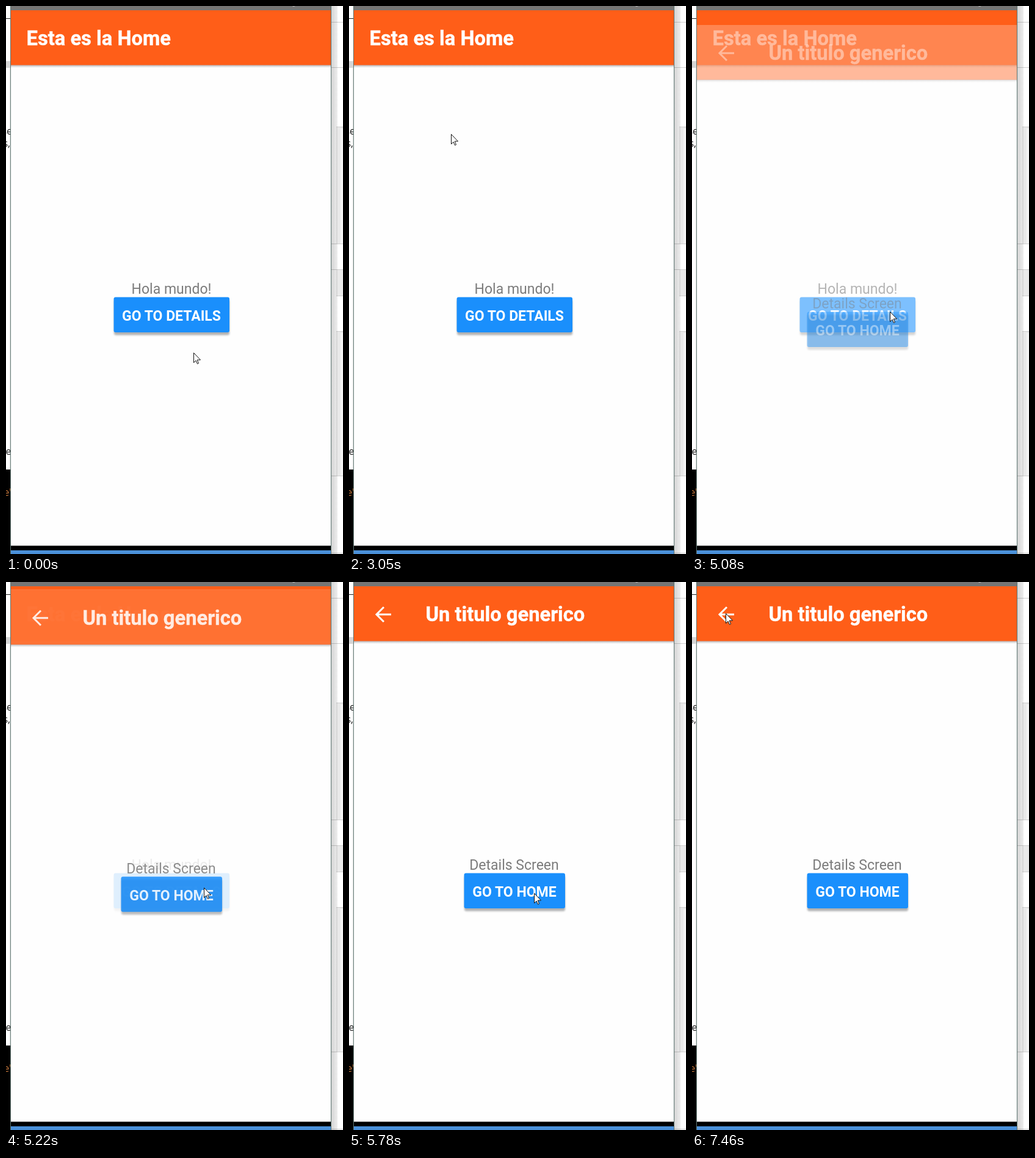
Animation, 552 px wide and 895 px high, one loop 8 s. Source, as an HTML page:

```html
<!DOCTYPE html>
<html lang="es">
<meta charset="utf-8">
<style>
  html, body { margin: 0; width: 100%; height: 100%; overflow: hidden; background: #fff }
  svg { display: block; width: 552px; height: 895px; font: 23px Roboto, sans-serif }
  .title { font-size: 32.7px; font-weight: 700; fill: #fff; stroke: #fff; stroke-width: .4 }
  .label { font-weight: 700; fill: #fff; text-anchor: middle }
  .note { fill: #7c7c7c; text-anchor: middle }
  .bar { fill: #ff5e18 }
  .button { fill: #1a8ffc }
  .shade { opacity: .3; filter: blur(1.8px) }
  .soft { filter: blur(.5px) }
  .page { font: 16px "Open Sans", sans-serif; fill: #222; text-anchor: end }
  /* each part fades on its own, so overlapping parts show through */
  #details > * { opacity: var(--shown) }
</style>
<svg viewBox="0 0 552 895">
  <defs>
    <linearGradient id="drop" x2="0" y2="1">
      <stop stop-color="#88858c" stop-opacity=".7"/>
      <stop offset="1" stop-color="#aaa" stop-opacity="0"/>
    </linearGradient>
    <linearGradient id="side">
      <stop stop-color="#000" stop-opacity=".17"/>
      <stop offset="1" stop-color="#000" stop-opacity=".07"/>
    </linearGradient>
    <clipPath id="screen"><path d="M8 0H532V882H8Z"/></clipPath>
  </defs>

  <!-- windows behind the phone -->
  <path fill="#e9e9e9" d="M541 197h11v191h-11zM541 431h11v42h-11zM541 532h11v235h-11z"/>
  <path fill="#f4f4f4" d="M548 200h4v188h-4zM548 534h4v233h-4z"/>
  <path stroke="#cfcfcf" d="M533 26.5h19M533 100.5h19M541 197.5h11M533 388.5h19M533 430.5h19M541 473.5h11M541 531.5h11M533 767.5h19M533 893.5h19"/>
  <path fill="url(#side)" d="M533 0h10v895h-10z"/>
  <path fill="#d6d6d6" d="M0 90h8v11H0z"/>
  <path fill="#f1f1f1" d="M5 101h3v656H5z"/>
  <path stroke="#222" d="M0 20.5h8"/>
  <path d="M0 757h8v138H0z"/>
  <g class="page">
    <text x="10" y="210">se</text>
    <text x="7" y="230">s,</text>
    <text x="8.5" y="733">e</text>
    <text x="8.5" y="800" fill="#c8783c" style="fill:#c8783c">e'</text>
  </g>

  <!-- phone -->
  <path fill="#fefefe" d="M8 0h524v895H8z"/>
  <g clip-path="url(#screen)"><g class="soft">
    <path fill="#757575" d="M0-5h540V7H0z"/>
    <path fill="#bbb" d="M469 0h5l-2 1h-2z"/>
    <path fill="url(#drop)" d="M0 96h540v5H0z"/>
    <path class="bar" d="M0 7h540v89.5H0z"/>
    <text class="title" x="33.5" y="64">Esta es la Home</text>
    <text class="note" x="271" y="470">Hola mundo!</text>
    <rect class="shade" x="177" y="480" width="189" height="57.5" rx="3"/>
    <rect class="button" x="176.5" y="475.5" width="189.5" height="57.5" rx="3"/>
    <text class="label" x="271" y="514">GO TO DETAILS</text>
    <g id="details">
      <path fill="#fefefe" d="M0 7h540v890H0z"/>
      <path fill="url(#drop)" d="M0 96h540v5H0z"/>
      <path class="bar" d="M0 7h540v89.5H0z"/>
      <path d="M69 53H45M57 41 45 53 57 65" fill="none" stroke="#fff" stroke-width="3"/>
      <text class="title" x="125.5" y="64">Un titulo generico</text>
      <text class="note" x="270.5" y="470">Details Screen</text>
      <g><rect class="shade" x="189" y="480" width="165" height="57.5" rx="3"/></g>
      <rect class="button" x="188.5" y="475.5" width="165.5" height="57.5" rx="3"/>
      <text class="label" x="271" y="514">GO TO HOME</text>
    </g>
  </g></g>
  <path d="M8 882h524v7H8z"/>
  <path stroke="#777" d="M8 881.5h524"/>
  <path fill="#4a90d9" d="M8 889h524v6H8z"/>
  <path stroke="#5d7470" d="M7.5 0v895M532.5 0v895"/>
  <path id="cursor" fill="#fff" stroke="#111" d="M.5 .5V16.5L4 13 6.5 18.5 8.5 17.5 6.2 12H11.5Z"/>
</svg>
<script>
  const LOOP = 8000, TICK = 130, OPEN = 5080, RISE = 42;
  const cursor = document.getElementById('cursor');
  const details = document.getElementById('details');

  // pointer strokes: start time, number of steps, end point
  const strokes = [
    [1930, 2, 272, 524], [2210, 1, 293, 508], [2770, 5, 99, 47],
    [3480, 5, 324, 499], [5780, 3, 242, 533], [6200, 2, 319, 483],
    [6470, 2, 229, 267], [6750, 1, 107, 161], [6900, 2, 65, 133],
    [7180, 3, 55, 51]
  ];

  const ticksSince = (start, t) => Math.floor((t - start) / TICK);
  const ease = u => u * u * (3 - 2 * u);

  function pointerAt(t) {
    let x = 307, y = 566;
    for (const [start, steps, endX, endY] of strokes) {
      if (t < start) break;
      const u = ease(Math.min(1, (ticksSince(start, t) + 1) / steps));
      x += (endX - x) * u;
      y += (endY - y) * u;
    }
    return [Math.round(x), Math.round(y)];
  }

  // the details screen closes most of the remaining gap on every tick
  const gapAt = t => t < OPEN ? 1 : .57 * .24 ** ticksSince(OPEN, t);

  function draw() {
    const t = performance.now() % LOOP;
    const gap = gapAt(t);
    cursor.setAttribute('transform', `translate(${pointerAt(t)})`);
    details.setAttribute('transform', `translate(0 ${RISE * gap})`);
    details.style.setProperty('--shown', 1 - gap);
    requestAnimationFrame(draw);
  }
  draw();
</script>
</html>
```
